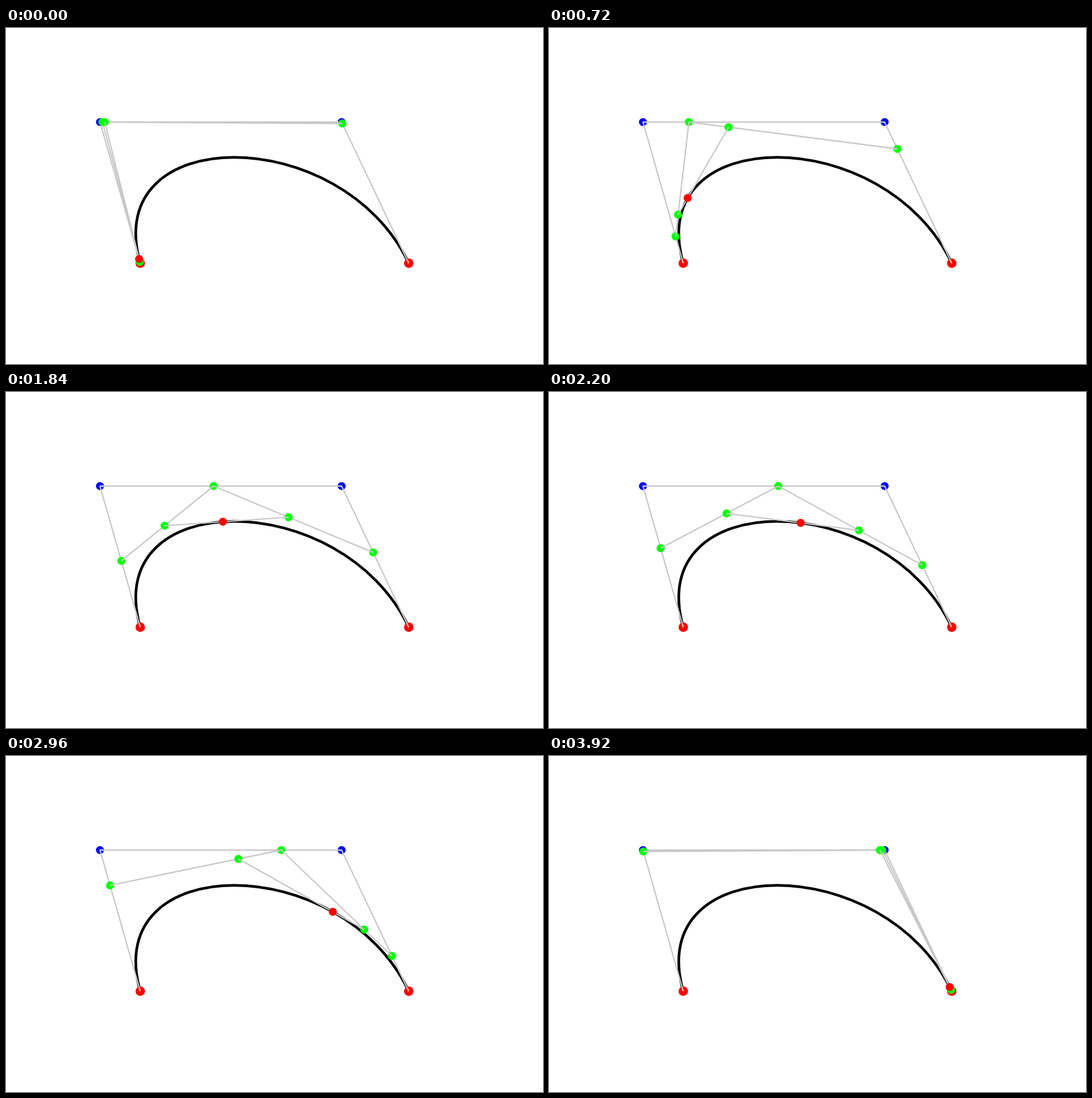
These frames come from a looping animation (947x592 px, 3.96 s). An HTML page with a canvas:

```html
<!DOCTYPE html>
<html lang="en">
<head>
<meta charset="utf-8">
<title>Cubic curve construction</title>
<style>
html, body { margin: 0; width: 100%; height: 100%; overflow: hidden; background: #fff; }
canvas { display: block; }
</style>
</head>
<body>
<canvas id="stage" width="947" height="592"></canvas>
<script>
const ctx = document.getElementById('stage').getContext('2d');
const W = 947, H = 592, STEP = 40, STEPS = 99;
const RED = '#f00', GREEN = '#0f0', BLUE = '#00f';
const controls = [[.25, .7], [.175, .28], [.625, .28], [.75, .7]].map(([x, y]) => [x * W, y * H]);

function dot([x, y], color, radius = 7.1) {
  ctx.fillStyle = color;
  ctx.beginPath();
  ctx.arc(x, y, radius, 0, 2 * Math.PI);
  ctx.fill();
}

function polyline(points) {
  ctx.strokeStyle = '#c8c8c8';
  ctx.lineWidth = 2.37;
  ctx.beginPath();
  points.forEach(p => ctx.lineTo(...p));
  ctx.stroke();
}

function curve([a, b, c, d]) {
  ctx.strokeStyle = '#000';
  ctx.lineWidth = 4.74;
  ctx.beginPath();
  ctx.moveTo(...a);
  ctx.bezierCurveTo(...b, ...c, ...d);
  ctx.stroke();
}

// One round of de Casteljau interpolation
const reduce = (points, t) =>
  points.slice(1).map((p, i) => p.map((v, k) => points[i][k] + (v - points[i][k]) * t));

function draw(now) {
  const t = (Math.floor(now / STEP) % STEPS + 1) / (STEPS + 1);
  ctx.clearRect(0, 0, W, H);
  ctx.lineJoin = 'round';
  curve(controls);
  controls.forEach((p, i) => i % 3 ? dot(p, BLUE) : dot(p, RED, 8.3));
  polyline(controls);

  let points = reduce(controls, t);
  while (points.length > 1) {
    points.forEach(p => dot(p, GREEN));
    polyline(points);
    points = reduce(points, t);
  }
  dot(points[0], RED);
}

const start = performance.now();
function tick() {
  draw(performance.now() - start);
  requestAnimationFrame(tick);
}
tick();
</script>
</body>
</html>
```
